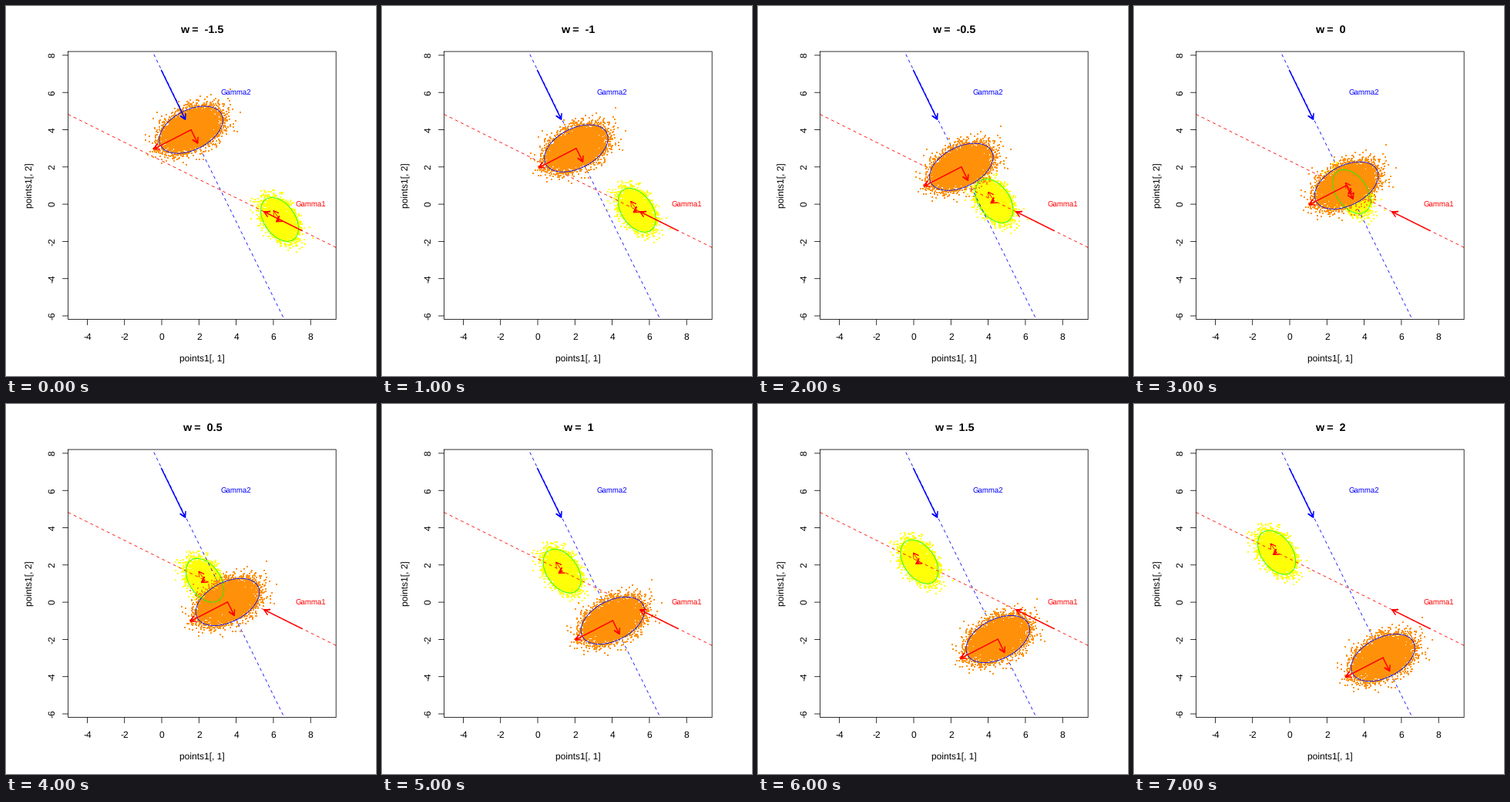
Animation, 480 px wide and 480 px high, one loop 8000 ms. Source, as a matplotlib script:

```python
import numpy as np
import matplotlib.pyplot as plt
from matplotlib.animation import FuncAnimation

plt.rcParams["font.family"] = "Liberation Sans"
plt.rcParams["text.hinting"] = "no_hinting"
plt.rcParams["lines.scale_dashes"] = False
plt.rcParams["toolbar"] = "None"

SIZE = 480
UNIT, X0, Y0 = 24.15, 202.0, 257.1
LEFT, TOP, RIGHT, BOTTOM = 80.64, 59.04, 428.16, 406.56
MID_X, MID_Y = (LEFT + RIGHT) / 2, (TOP + BOTTOM) / 2
ORANGE, YELLOW = "#FF910A", "#FFFF08"
THIN, THICK = 0.8, 1.5

# One point is one pixel at 72 dpi; the axes use pixel coordinates.
fig = plt.figure(figsize=(SIZE / 72, SIZE / 72), dpi=72, facecolor="white")
ax = fig.add_axes([0, 0, 1, 1])
ax.set_xlim(0, SIZE)
ax.set_ylim(SIZE, 0)
ax.axis("off")


def line(xs, ys, color="black", lw=THIN, z=1, **kw):
    kw = {"solid_capstyle": "round", "snap": False, **kw}
    return ax.plot(xs, ys, color=color, lw=lw, zorder=z, **kw)[0]


def label(x, y, s, size=12, rot=0, **kw):
    return ax.text(x, y, s, fontsize=size, rotation=rot, ha="center",
                   va="baseline", rotation_mode="anchor", zorder=8, **kw)


def arrow_path(dx, dy, head=7.5):
    """Shaft from the origin with an open 30 degree head at (dx, dy)."""
    back = np.arctan2(-dy, -dx)
    barbs = [(dx + head * np.cos(back + a), dy + head * np.sin(back + a))
             for a in (-np.pi / 6, np.pi / 6)]
    return np.array([(0, 0), (dx, dy), barbs[0], (dx, dy), barbs[1]])


def oval(a, b, tilt, r=1.0, t=None):
    """Points of a tilted ellipse, or a tilted scatter when r and t vary."""
    t = np.linspace(0, 2 * np.pi, 121) if t is None else t
    u, v = a * r * np.cos(t), b * r * np.sin(t)
    c, s = np.cos(tilt), np.sin(tilt)
    return np.column_stack([u * c - v * s, u * s + v * c])


def cloud(a, b, tilt, n, rng):
    """Gaussian scatter with 95 % of its points inside the ellipse."""
    q = (np.arange(n) + 0.5) / n
    r = np.sqrt(-2 * np.log(1 - q)) / 2.448
    return oval(a, b, tilt, r, 2 * np.pi * rng.random(n))


class Group:
    """Shapes that travel together with one moving centre."""

    def __init__(self, start, step):
        self.start, self.step = np.array(start), np.array(step)
        self.parts = []

    def add(self, shape, color, lw=THIN, z=1, **kw):
        art = line([], [], color, lw, z, **kw)
        self.parts.append((art, shape))

    def move(self, w):
        cx, cy = self.start + w * self.step
        for art, shape in self.parts:
            art.set_data(shape[:, 0] + cx, shape[:, 1] + cy)
        return [art for art, _ in self.parts]


# Frame, ticks and labels
line([LEFT, RIGHT, RIGHT, LEFT, LEFT], [TOP, TOP, BOTTOM, BOTTOM, TOP], z=7)
for v in range(-4, 9, 2):
    x = X0 + v * UNIT
    line([x, x], [BOTTOM, BOTTOM + 7.2], z=7)
    label(x, 432.8, str(v))
for v in range(-6, 9, 2):
    y = Y0 - v * UNIT
    line([LEFT, LEFT - 7.2], [y, y], z=7)
    label(63.6, y, str(v), rot=90)
label(MID_X, 461.3, "points1[, 1]")
label(34.8, MID_Y, "points1[, 2]", rot=90)
title = label(MID_X, 34.9, "", 14.4, weight="bold")
label(298.7, 116.2, "Gamma2", 9.6, color="blue")
label(395.2, 261.3, "Gamma1", 9.6, color="red")

# Fixed axes and their direction arrows
line([LEFT, RIGHT], [140.6, 313.3], "red", THIN, 3, ls=(0, (4, 4)))
line([190, 361], [TOP, BOTTOM], "blue", THIN, 3, ls=(4, (4, 4)))
for x, y, dx, dy, color in [(201.5, 83.3, 31, 63.6, "blue"),
                            (384, 291.5, -49, -24.5, "red")]:
    p = arrow_path(dx, dy) + (x, y)
    line(p[:, 0], p[:, 1], color, THICK, 6)

# Two drifting clouds
rng = np.random.default_rng(5)
dots = dict(ls="none", marker="s", markersize=2, markeredgewidth=0, snap=None)

gold = Group((282.2, 240.8), (-48.55, -24.1))
shape = (31.7, 20.0, np.radians(55))
gold.add(cloud(*shape, 6000, rng), YELLOW, z=2, **dots)
gold.add(oval(*shape), "#00FF00", THIN, 5)
gold.add(arrow_path(-8, -11.5), "red", THIN, 6)
gold.add(arrow_path(-4.2, 2.7), "red", THICK, 6)

amber = Group((275.6, 232.8), (23.7, 48.15))
shape = (44.4, 25.8, np.radians(-27))
amber.add(cloud(*shape, 9000, rng), ORANGE, z=4, **dots)
amber.add(oval(*shape), "blue", THIN, 5)
amber.add(arrow_path(-48.2, 24.9), "red", THICK, 6)
amber.add(arrow_path(8.6, 17.3), "red", THICK, 6)


def draw(i):
    w = -1.5 + 0.5 * i
    title.set_text(f"w =  {w:g}")
    return gold.move(w) + amber.move(w) + [title]


anim = FuncAnimation(fig, draw, frames=8, interval=1000, repeat=True,
                     repeat_delay=0, blit=False)
plt.show()
```
